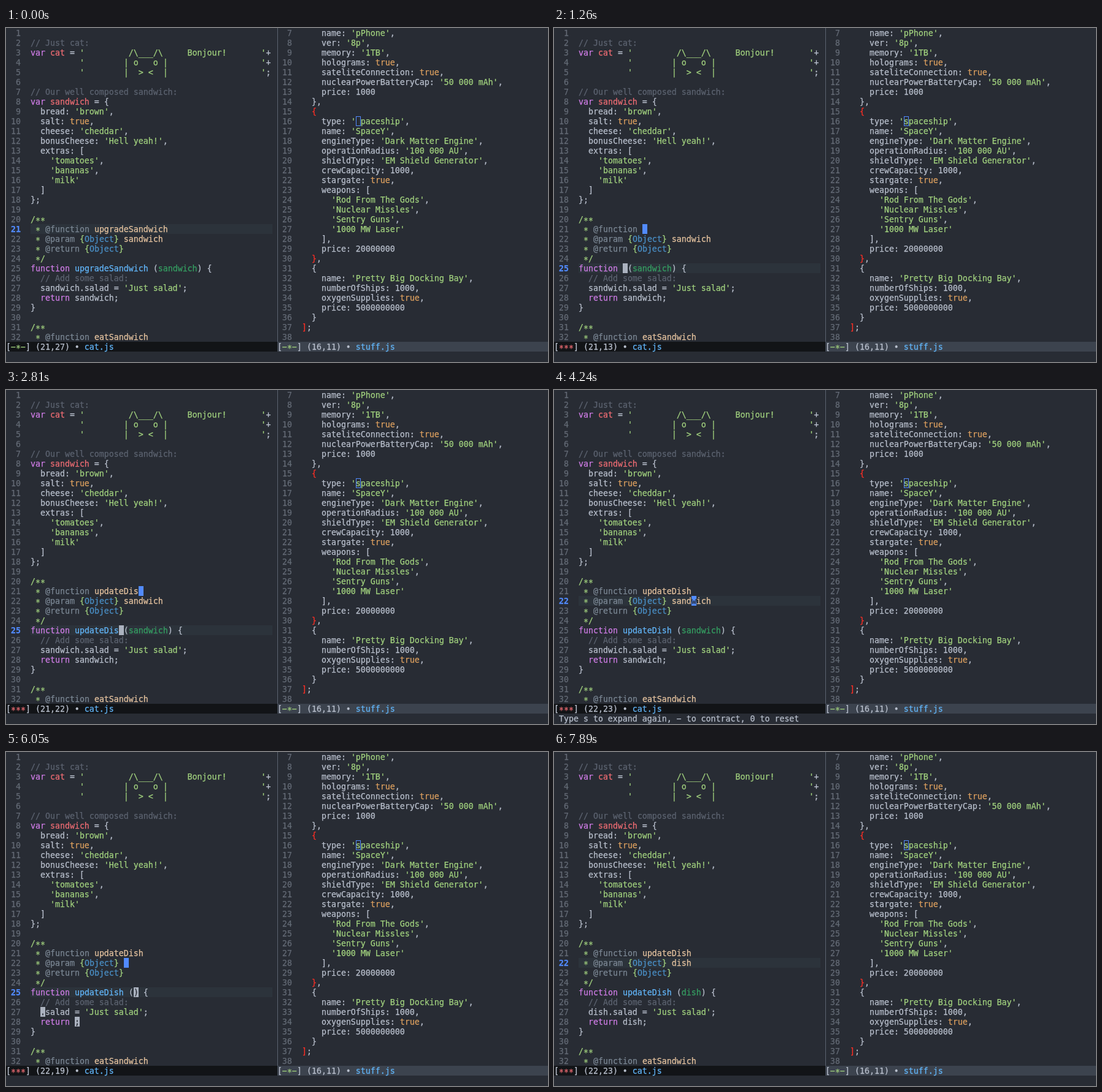
Animation of 883x545 px, one loop 8 s. Source, as an HTML page:

```html
<!DOCTYPE html>
<html lang="en">
<head>
<meta charset="utf-8">
<title>Editor</title>
<style>
  html, body { margin: 0; width: 100%; height: 100%; overflow: hidden; background: #282c34; }
  #stage {
    position: absolute; left: 0; top: 0; width: 883px; height: 545px; overflow: hidden;
    background: #282c34; color: #b8bfcc;
    font: 13.288px/18px "DejaVu Sans Mono", "Liberation Mono", monospace;
    font-variant-ligatures: none;
    -webkit-text-stroke: 0.25px currentColor;
  }
  #stage div { position: absolute; white-space: pre; height: 16px; }
  #stage .pane { top: 0; width: 441px; height: 545px; }
  #right { left: 442px; }
  #stage .split { left: 442px; top: 0; width: 1px; height: 512px; background: #5c6370; }
  .num { left: 8px; color: #636a75; }
  .num.now { color: #528bff; font-weight: bold; }
  .code { left: 40px; }
  .hl { left: 40px; width: 394px; background: #2c333b; }
  .region { background: #3e4451; }
  .block { width: 8px; color: #282c34; background: #abb2bf; }
  .block.real { background: #528bff; }
  .hollow { box-sizing: border-box; width: 8px; border: 1px solid #528bff; }
  .mode { left: 0; top: 512px; width: 442px; background: #121417; }
  #right .mode { background: #3c434e; }
  .echo { left: 8px; top: 528px; }
  .star { position: relative; top: 2px; }
  .c { color: #5c6370; } .g { color: #a1d17e; } .k { color: #ce7ce5; } .o { color: #dda05f; }
  .r { color: #ee6c73; } .b { color: #62b6fa; } .t { color: #7b8794; } .y { color: #4a8fc6; }
  .v { color: #e5c39f; } .a { color: #359f62; } .e { color: #ff2f26; } .n { color: #62c0f2; }
</style>
</head>
<body>
<div id="stage">
  <div class="pane" id="left"></div>
  <div class="pane" id="right"></div>
  <div class="split"></div>
</div>
<script>
const LOOP = 8000, CELL = 8, LINE = 16;

// ~x:text~ sets a colour class; the rest is coloured by syntax
const leftCode = s => {
  const nameRaw = s.raw === 'name', argRaw = s.raw === 'arg';
  const tint = (cls, text) => text && `~${cls}:${text}~`;
  const doc = text => ` ~g:*~ ${text}`;
  const type = '~g:{~~y:Object~~g:}~';
  const head = nameRaw ? `~n:function~ ${s.name} ~e:(~` : `function ${tint('b', s.name)} (`;
  return String.raw`
// Just cat:
var ~r:cat~ = '         /\___/\     Bonjour!       '+
          '        | o   o |                   '+
          '        |  > <  |                   ';

// Our well composed sandwich:
var ~r:sandwich~ = {
  bread: 'brown',
  salt: true,
  cheese: 'cheddar',
  bonusCheese: 'Hell yeah!',
  extras: [
    'tomatoes',
    'bananas',
    'milk'
  ]
};

~g:/**~
${doc('~t:@function~ ' + tint(nameRaw ? 'g' : 'v', s.name))}
${doc(`~t:@param~ ${type} ` + tint(argRaw ? 'g' : 'v', s.arg))}
${doc(`~t:@return~ ${type}`)}
 ~g:*/~
${head}${argRaw ? s.arg : tint('a', s.arg)}) {
  // Add some salad:
  ${s.arg}.salad = 'Just salad';
  return ${s.arg};
}

~g:/**~
${doc('~t:@function~ ~v:eatSandwich~')}`.split('\n');
};

const rightCode = `    name: 'pPhone',
    ver: '8p',
    memory: '1TB',
    holograms: true,
    sateliteConnection: true,
    nuclearPowerBatteryCap: '50 000 mAh',
    price: 1000
  },
  ~e:{~
    type: 'spaceship',
    name: 'SpaceY',
    engineType: 'Dark Matter Engine',
    operationRadius: '100 000 AU',
    shieldType: 'EM Shield Generator',
    crewCapacity: 1000,
    stargate: true,
    weapons: [
      'Rod From The Gods',
      'Nuclear Missles',
      'Sentry Guns',
      '1000 MW Laser'
    ],
    price: 20000000
  ~e:}~,
  {
    name: 'Pretty Big Docking Bay',
    numberOfShips: 1000,
    oxygenSupplies: true,
    price: 5000000000
  }
~e:]~;
`.split('\n');

const hint = 'Type s to expand again, − to contract, 0 to reset';

// Each step changes part of the editor state
const steps = [
  [0, { name: 'upgradeSandwich', arg: 'sandwich', raw: '', row: 21, col: 27, hl: 21, on: false,
        edit: 'name', marks: 0, sel: false, dirty: false, focus: false, msg: '' }],
  [120, { msg: hint, sel: true, marks: 1, col: 13, on: true }],
  [480, { msg: '', marks: 2, hl: 25, focus: true }],
  [990, { on: false }],
  [1260, { on: true, name: '', sel: false, dirty: true }],
  ...typed('name', 'updateDish', 13, [1490, 1660, 1830, 1990, 2170, 2340, 2570, 2690, 2810, 2960]),
  [1490, { raw: 'name' }],
  [2480, { raw: '' }],
  [3310, { marks: 0, hl: 21 }],
  [3730, { row: 22, hl: 22 }],
  [4240, { msg: hint, edit: 'arg' }],
  [4330, { sel: true, marks: 1, col: 19 }],
  [4800, { msg: '', marks: 2, hl: 25 }],
  [5150, { marks: 3 }],
  [5570, { marks: 4 }],
  [6050, { arg: '', sel: false }],
  ...typed('arg', 'dish', 19, [6230, 6560, 6700, 6860]),
  [6230, { raw: 'arg' }],
  [7030, { raw: '' }],
  [7330, { marks: 0, hl: 22 }],
  [7890, { on: false }],
].sort((a, b) => a[0] - b[0]);

function typed(field, word, start, times) {
  return times.map((t, i) => [t, { [field]: word.slice(0, i + 1), col: start + i + 1 }]);
}

const syntax = /~(\w):(.*?)~|('[^']*')|(\/\/.*)|\b(var|function|return)\b|\b(true)\b/g;
const escape = text => text.replace(/&/g, '&amp;').replace(/</g, '&lt;').replace(/>/g, '&gt;')
  .replace(/\*/g, '<span class="star">*</span>');
const span = (cls, text) => `<span class="${cls}">${escape(text)}</span>`;

function paint(line) {
  let out = '', last = 0;
  for (const m of line.matchAll(syntax)) {
    const [all, cls, text, str, note, word] = m;
    out += escape(line.slice(last, m.index));
    out += cls ? span(cls, text) : span(str ? 'g' : note ? 'c' : word ? 'k' : 'o', all);
    last = m.index + all.length;
  }
  return out + escape(line.slice(last));
}

const plain = line => line.replace(/~\w:(.*?)~/g, '$1');
const box = (cls, row, style = '', html = '') =>
  `<div class="${cls}" style="top:${(row - 1) * LINE}px;${style}">${html}</div>`;
const at = col => `left:${40 + col * CELL}px;`;

const listing = (lines, first, now) => lines.map((line, i) =>
  box(first + i === now ? 'num now' : 'num', i + 1, '', String(first + i).padStart(2)) +
  box('code', i + 1, '', paint(line))).join('');

const modeLine = (dirty, row, col, file) =>
  `<div class="mode">[${span(dirty ? 'r' : 'g', dirty ? '***' : '−*−')}] (${row},${col}) • ${span('b', file)}</div>`;

function spots(s) {
  return s.edit === 'name'
    ? [[21, 13], [25, 9]]
    : [[22, 19], [25, 11 + s.name.length], [27, 2], [28, 9]];
}

function drawLeft(s) {
  const lines = leftCode(s), word = s[s.edit];
  const block = (cls, row, col) =>
    box(cls, row, at(col), escape(plain(lines[row - 1])[col] || ' '));
  const marked = spots(s).slice(0, s.marks);
  let html = box('hl', s.hl);
  if (s.sel) for (const [row, col] of marked)
    html += box('region', row, `${at(col)}width:${word.length * CELL}px`);
  html += listing(lines, 1, s.hl);
  for (const [row, col] of marked.slice(1))
    html += block('block', row, col + (s.sel ? 0 : word.length));
  if (s.on) html += block('block real', s.row, s.col);
  html += modeLine(s.dirty, s.row, s.col, 'cat.js');
  return html + `<div class="echo">${s.msg}</div>`;
}

function drawRight(s) {
  const lines = s.focus ? rightCode : rightCode.map(l => l.replace("'spaceship", "' paceship"));
  return listing(lines, 7, 0) + box('hollow', 10, at(11)) + modeLine(false, 16, 11, 'stuff.js');
}

const left = document.getElementById('left'), right = document.getElementById('right');
let shown = -1;

function show(t) {
  const count = steps.filter(([time]) => time <= t).length;
  if (count === shown) return;
  shown = count;
  const state = Object.assign({}, ...steps.slice(0, count).map(step => step[1]));
  left.innerHTML = drawLeft(state);
  right.innerHTML = drawRight(state);
}

const start = performance.now();
function tick() {
  show((performance.now() - start) % LOOP);
  requestAnimationFrame(tick);
}
tick();
</script>
</body>
</html>
```
